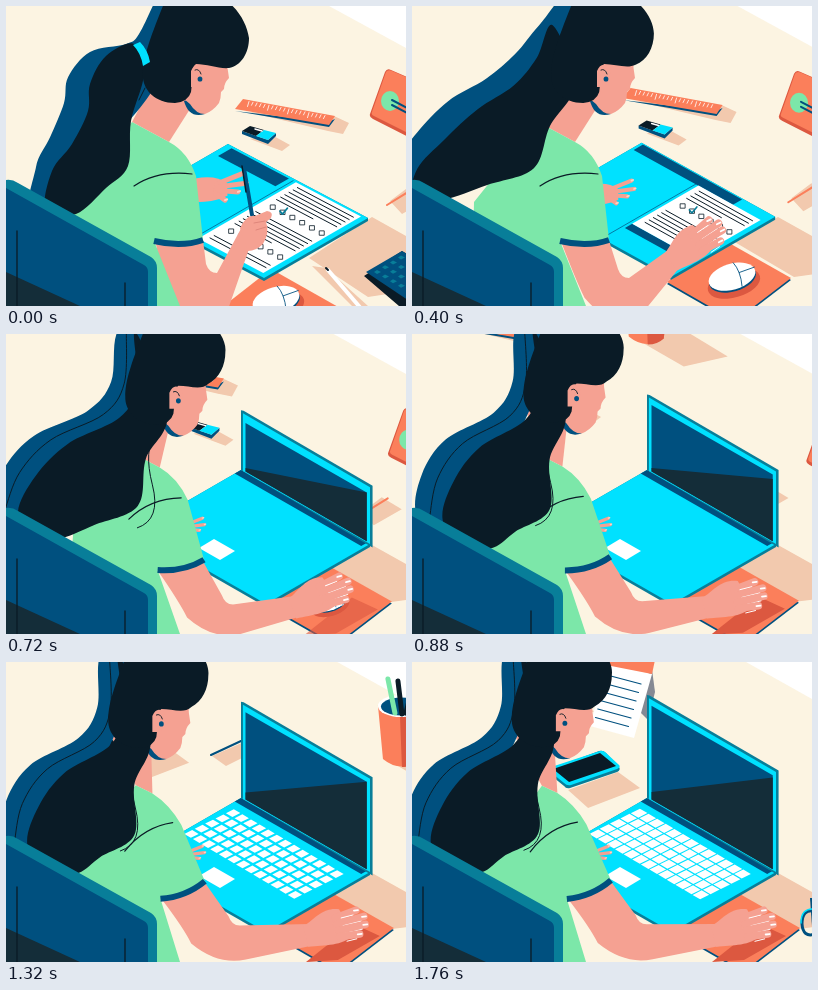
An HTML page for the animation above (1800 ms loop, 400 by 300 pixels).

```html
<!DOCTYPE html>
<html lang="en">
<head>
<meta charset="utf-8">
<title>From paper to laptop</title>
<style>
html, body { margin: 0; width: 100%; height: 100%; overflow: hidden; background: #fcf4e2; }
svg { display: block; width: 100vw; height: 100vh; }
</style>
</head>
<body>
<svg id="stage" viewBox="0 0 400 300" stroke-linecap="round" stroke-linejoin="round"></svg>
<script>
const LOOP = 1800, STEP = 40;
const C = {
  cream: '#fcf4e2', peach: '#f2c9ae', orange: '#fb7f5b', rust: '#dc5840', cyan: '#00e1ff', grey: '#858993',
  navy: '#00507f', teal: '#087e99', ink: '#0a1b26', dusk: '#142d39', skin: '#f5a192', green: '#7ce7a9', white: '#fff'
};

/* ---------- motion ---------- */
const settle = (t, from, tau) => t < from ? 0 : 1 - Math.exp((from - t) / tau);
const ease = (t, from, to) => {
  const s = Math.max(0, Math.min(1, (t - from) / (to - from)));
  return s * s * (3 - 2 * s);
};
const glide = t => 1 - Math.exp((1080 - t) / 270);
const rush = t => Math.max(0, (t - 180) / 380) ** 2;
const mix = (a, b, k) => Array.isArray(a) ? a.map((v, i) => mix(v, b[i], k)) : a + (b - a) * k;

/* ---------- drawing ---------- */
const pairs = a => Array.from({ length: a.length / 2 }, (_, i) => [a[2 * i], a[2 * i + 1]]);
const xy = p => p.map(v => +v.toFixed(2)).join(' ');
const path = (d, fill, extra = '') => `<path d="${d}" fill="${fill}" ${extra}/>`;
const line = (d, color, width = 1) => path(d, 'none', `stroke="${color}" stroke-width="${width}"`);
const poly = (points, fill, extra) => path('M' + points.map(xy).join('L') + 'Z', fill, extra);
const flat = (fill, ...n) => poly(pairs(n), fill);
const seg = (a, b, color, width) => line(`M${xy(a)}L${xy(b)}`, color, width);
const oval = (x, y, rx, ry, fill) => `<ellipse cx="${x}" cy="${y}" rx="${rx}" ry="${ry}" fill="${fill}"/>`;
const moved = (x, y, body, turn = 0, size = 1) =>
  `<g transform="translate(${xy([x, y])}) rotate(${turn.toFixed(2)}) scale(${size.toFixed(3)})">${body}</g>`;

// Catmull-Rom spline through the points.
function smooth(points, closed = true) {
  const n = points.length;
  const at = i => closed ? points[(i + n) % n] : points[Math.max(0, Math.min(n - 1, i))];
  let d = 'M' + xy(points[0]);
  for (let i = 0; i < (closed ? n : n - 1); i++) {
    const [a, b, c, e] = [at(i - 1), at(i), at(i + 1), at(i + 2)];
    d += 'C' + xy([b[0] + (c[0] - a[0]) / 6, b[1] + (c[1] - a[1]) / 6,
      c[0] - (e[0] - b[0]) / 6, c[1] - (e[1] - b[1]) / 6, ...c]);
  }
  return d + (closed ? 'Z' : '');
}

/* ---------- things on the table ---------- */
function ruler() {
  let s = flat(C.peach, 242, 106, 322, 125, 337, 128, 343, 117, 328, 110)
    + flat(C.navy, 229, 105, 323, 121, 329, 113, 322, 116) + flat(C.orange, 229, 103, 237, 93, 329, 110, 323, 119);
  for (let i = 0; i < 20; i++) {
    const x = 243 + i * 4, y = 95.5 + i * .74;
    s += seg([x, y], [x - 1.5, y + (i % 5 ? 3 : 5)], C.white, .8);
  }
  return s;
}
const eraser = () => flat(C.peach, 244, 133, 276, 145, 284, 139, 264, 128)
  + flat(C.navy, 236, 125, 262, 134, 270, 127, 270, 130, 262, 138, 236, 128)
  + flat(C.ink, 236, 125, 244, 120, 258, 124, 250, 130) + flat(C.cyan, 250, 130, 258, 124, 270, 127, 262, 134)
  + seg([249, 123], [256, 125], C.white, 1.5);
const notebook = () => path('M364 108L379 66Q381 62 385 64L440 88V150L367 113Q363 111 364 108Z', C.rust)
  + path('M366 106L380 66Q382 63 386 65L440 88V146L368 110Q365 109 366 106Z', C.orange)
  + oval(384, 95, 9, 10, C.green) + line('M386 94L405 104M386 99L405 109', C.navy, 2);
const strip = () => flat(C.peach, 384, 195, 404, 180, 424, 192, 396, 208) + seg([381, 199], [410, 181], C.orange, 2);
function calculator() {
  let s = flat(C.ink, 358, 270, 396, 245, 440, 272, 400, 300, 400, 306) + flat(C.navy, 360, 266, 396, 245, 440, 270, 402, 294);
  for (let i = 0; i < 5; i++) for (let j = 0; j < 4; j++) {
    const x = 371 + i * 8 + j * 8, y = 266 + i * 4.6 - j * 4.8;
    s += flat(C.teal, x - 3, y, x, y - 2, x + 4, y, x, y + 2);
  }
  return s;
}
const whitePen = () => flat(C.peach, 306, 260, 320, 262, 362, 300, 346, 300)
  + seg([322, 264], [358, 306], C.white, 4) + seg([320, 262], [322, 264], C.ink, 2);
const cup = () => flat(C.peach, 354, 44, 420, 84, 376, 94, 336, 71)
  + path('M316 10L321 64Q338 78 356 66L362 10Z', C.orange) + path('M338 20L362 10L356 66Q350 72 340 72Z', C.rust)
  + oval(339, 11, 23, 11, C.white) + oval(339, 11.5, 20, 9, C.navy)
  + line('M333 18L326 -16', C.green, 5) + line('M340 19L336 -14M344 18L352 -14', C.ink, 5);
const phone = () => flat(C.peach, -16, 21, 34, 3, 56, 19, 4, 39)
  + path('M-36 1L15 -18Q19 -19 22 -16L35 -2Q37 1 33 3L-14 19Q-18 20 -20 17L-36 4Z', C.teal)
  + path('M-36 -1L16 -18Q19 -19 22 -16L35 -4Q37 -2 33 0L-13 16Q-17 17 -20 14L-36 1Z', C.cyan)
  + flat(C.ink, -31, 0, 16, -16, 32, -3, -15, 13);
function calendar() {
  let s = flat(C.grey, 239, 0, 243, 30, 236, 58, 228, 50) + flat(C.white, 195, 2, 240, 12, 222, 76, 178, 64)
    + flat(C.orange, 196, -8, 243, -2, 240, 12, 194, 3);
  for (let i = 0; i < 6; i++) s += seg([195 - i * 2.3, 13 + i * 8.5], [229 - i * 2.5, 22 + i * 8.5], C.navy, 1.2);
  return s;
}
const stick = () => flat(C.peach, 206, 94, 238, 80, 244, 92, 220, 104) + seg([205, 93], [235, 79], C.navy, 2);
const mug = () => flat(C.navy, 398, 236, 430, 236, 430, 278, 401, 278) + line('M402 249Q390 247 390 262Q391 276 403 272', C.navy, 3)
  + line('M402 247Q389 246 389 261', C.cyan, 1.5);

function table(t) {
  const along = (d, body, slope = .59) => Math.abs(d) > 400 ? '' : moved(d, d * slope, body);
  const out = rush(t), come = glide(t), rest = come - glide(1760), d = Math.exp(-t / 223);
  return flat(C.cream, 0, 0, 400, 0, 400, 300, 0, 300) + flat(C.white, 323 + t / 160, 0, 400, 0, 400, 42 - t / 350)
    + along(-55 * out, ruler()) + along(-28 * out, eraser()) + along(9 * out, notebook()) + along(-14 * out, strip())
    + along(95 * come, cup()) + along(180 * (come - glide(1320)), stick())
    + moved(47, 37, along(136 * come, phone(), .56)) + along(160 * rest, calendar(), .7)
    + flat(C.peach, 325 - 22 * d, 232 + 20 * d, 366, 211, 402, 231, 402, 265 + 20 * d, 386 - 24 * d, 267 + 24 * d)
    + along(t * .125, calculator()) + along(t * .4, whitePen()) + along(-60 * rest, mug());
}

function pad(t) {
  const d = Math.exp(-t / 223), grip = ease(t, 560, 840);
  const mouse = oval(0, 2, 24, 13, C.navy) + oval(0, 0, 24, 13, C.white) + line('M5 -13Q10 -3 7 12M8 -2L24 -3', C.navy, .8);
  return moved(-54 * d, 36 * d, flat(C.navy, 264, 272, 319, 229, 388, 268, 332, 311) + flat(C.orange, 264, 270, 319, 227, 388, 266, 332, 309)
      + path('M300 300L348 262L374 274L332 298Z', C.rust, `opacity="${grip}"`))
    + moved(330 - 60 * d - 8 * grip, 266 + 28 * d, oval(0, 7, 27, 14, C.rust) + mouse, -16, 1 - .45 * grip);
}

/* ---------- booklet that becomes a laptop ---------- */
function device(t) {
  const turn = ease(t, 200, 560);
  const [ox, oy, ux, uy] = mix([222, 138, 140, 74], [235, 136, 129, 74], turn);
  const at = (u, v, up = 0) => [ox + u * ux - v * 104, oy + u * uy + v * 60 - up];
  const quad = (u, v, w, z, fill) => poly([at(u, v), at(w, v), at(w, z), at(u, z)], fill);
  let s = poly([at(0, 0), at(1, 0), at(1, 0, -3), at(1, 1, -3), at(0, 1, -3), at(0, 1)], C.teal) + quad(0, 0, 1, 1, C.cyan)
    + quad(...mix([.04, .02, .45, .15], [0, 0, .98, .06], turn), C.navy);

  const fold = ease(t, 240, 660);
  if (fold < 1) {
    const top = mix(.02, .25, fold), end = mix(.96, .26, fold);
    if (fold > .1) s += quad(.5, end, .96, end + .07, C.navy);
    s += quad(.5, top, .965, end, C.white);
    for (let v = .06; v < .94; v += .04) {
      const row = Math.round((v - .06) / .04);
      if (v < top + .02 || v > end - .03) continue;
      if (row % 10 < 6) s += seg(at(.54, v), at(row % 10 === 5 ? .8 : .94, v), C.ink, 1);
      else if (row % 10 === 7) for (let i = 0; i < 6; i++) {
        const [x, y] = at(.575 + i * .07, v);
        s += path(`M${x - 2.5} ${y - 2}h4.6v4.4h-4.6z`, C.white, `stroke="${C.ink}" stroke-width=".8"`);
        if (i === 1 && row === 7) s += line(`M${x - 3} ${y - 1}l2.5 3l5 -6`, C.teal, 1.6);
      }
    }
    s += seg(at(.48, top), at(.48, 1), C.navy, .7);
  }

  const touch = ease(t, 440, 720);
  if (touch) s += flat(C.white, 193, 214, 208, 205, 208 + 21 * touch, 205 + 12 * touch, 193 + 21 * touch, 214 + 12 * touch);

  const size = .9 * settle(t, 880, 240), cols = 13, rows = 5;
  let keys = '';
  for (let i = 0; size && i < cols; i++) for (let j = 0; j < rows; j++) {
    const corner = (a, b) => {
      const u = (i + .5 + a * size) / cols, v = (j + .5 + b * size) / rows;
      return [228 + 112 * u - 52 * v, 146 + 66 * u + 26 * v];
    };
    keys += 'M' + [corner(-.5, -.5), corner(.5, -.5), corner(.5, .5), corner(-.5, .5)].map(xy).join('L') + 'Z';
  }
  s += path(keys, C.white);

  const h = 106 * settle(t, 400, 385);
  if (h) {
    const dim = settle(t, 880, 220), view = Math.max(0, h - 9) * ease(t, 440, 760);
    const a = at(.035, 0, 1), b = at(.975, 0, 1), up = (p, n) => [p[0], p[1] - n];
    s += poly([at(0, 0, h), at(.02, 0, h + 1), at(1.02, 0, h), at(1.02, 0, -2), at(1, 0, -2), at(0, 0)], C.teal)
      + poly([at(.015, 0, h - 2), at(1, 0, h - 3), at(1, 0), at(.015, 0)], C.cyan)
      + poly([a, up(a, view), up(b, view), b], C.navy)
      + poly([a, [a[0], Math.max(134 - 4 * dim, a[1] - view)], [b[0], Math.max(145 - 30 * dim, b[1] - view)], b], C.dusk);
  }
  return s;
}

/* ---------- woman ---------- */
function restingHand(t) {
  const k = ease(t, 200, 640), [x, y, size] = mix([204, 184, 1], [175, 195, .65], k);
  let s = path('M-16 -10Q4 -16 16 -9L18 4Q6 12 -16 14Z', C.skin);
  for (let i = 0; i < 4; i++) {
    const a = 32 - 4 * (i - 1) ** 2 + (i < 2 ? 3 : 0), b = -20 + 9.5 * i;
    s += seg([6, b / 3], [a, b], C.skin, 5) + seg([a, b], [a + 2, b - 1], '#fbd3c8', 2);
  }
  return moved(x, y, s, 6, size);
}

const ARM = {
  write: [150, 238, 166, 300, 190, 335, 243, 243, 238, 217, 203, 267, 197, 234],
  reach: [150, 238, 178, 285, 202, 308, 284, 282, 278, 262, 214, 276, 197, 235],
  rest: [157, 238, 186, 281, 213, 303, 308, 284, 306, 262, 227, 262, 199, 219]
};
function workingArm(t) {
  const swap = ease(t, 220, 560);
  const [hl, elbow, low, wl, wt, inner, hr] = pairs(mix(mix(ARM.write, ARM.reach, swap), ARM.rest, settle(t, 560, 330)));
  const arm = path(`M${xy(hl)}Q${xy([elbow[0] - 8, elbow[1] - 16])} ${xy(elbow)}Q${xy(low)} ${xy([low[0] + 28, Math.min(low[1] - 6, 315)])}L${xy(wl)}L${xy(wt)}L${xy([inner[0] + 8, inner[1]])}Q${xy(inner)} ${xy([inner[0] - 3, inner[1] - 9])}L${xy(hr)}Z`, C.skin);
  if (swap < .5) {
    const lean = Math.min(t, 200) / 28;
    const hand = path('M234 222Q241 208 249 210L261 205Q268 206 265 212L260 216Q264 226 257 238Q250 245 242 245Z', C.skin)
      + line('M248 217L259 215M250 224L260 221', '#d97f75', .8);
    const pen = seg([238, 162 + lean], [246, 209], C.navy, 4) + seg([236, 160 + lean], [240, 186], C.ink, 1.5);
    return moved(wt[0] - 238, wt[1] - 217, pen) + arm + moved(wt[0] - 238, wt[1] - 217, hand);
  }
  let hand = path('M-5 -10C8 -14 18 -24 34 -18L42 10C28 19 12 13 -5 11Z', C.skin);
  for (let i = 0; i < 4; i++) {
    const x = 57 - 3.5 * (i - 1.4) ** 2, y = -13 + 8 * i;
    hand += seg([28, y * .8], [x, y], C.skin, 7.5) + seg([x - 2, y], [x + 2, y + .5], C.white, 1.8)
      + seg([34, y + 4], [x - 4, y + 4], C.white, .9);
  }
  return arm + moved((wl[0] + wt[0]) / 2, (wl[1] + wt[1]) / 2, hand, -14 - 20 * (1 - ease(t, 480, 880)));
}

// Hair outlines relative to the ear: down the back edge, then up the neck edge.
const TIED = {
  back: [-65, -34, -93, -22, -109, 6, -111, 33, -127, 66, -147, 93, -153, 131],
  neck: [-123, 136, -93, 110, -71, 88, -68, 43, -55, -4]
};
const LOOSE = {
  back: [-42, -68, -37, -12, -50, 22, -96, 50, -122, 84, -133, 122, -112, 152],
  neck: [-82, 150, -60, 134, -26, 112, -26, 62, -10, 14]
};
const SHIRT = {
  upright: [126, 116, 163, 136, 182, 146, 190, 170, 197, 234, 148, 235, 62, 196],
  turned: [130, 124, 145, 131, 162, 142, 174, 162, 199, 218, 155, 237, 72, 203]
};

function woman(t) {
  const turn = settle(t, 480, 332), loose = ease(t, 240, 540);
  const ex = 193 - 42 * turn, ey = 72 - 12 * turn;
  const [cl, cr, shoulder, upper, hr, hl, side] = pairs(mix(SHIRT.upright, SHIRT.turned, turn));
  const hem = `M${xy(hr)}Q${xy([(hr[0] + hl[0]) / 2 + 3, (hr[1] + hl[1]) / 2 + 7])} ${xy(hl)}`;
  const [ax, ay, bx, by] = mix([128, 180, 186, 168], [118, 190, 165, 160], turn);

  let s = poly([[ex - 50, ey + 12], [ex - 8, ey + 18], [ex - 9, ey + 31], cr, cl], C.skin)
    + path(`M${xy(cl)}L${xy(cr)}Q${xy(shoulder)} ${xy(upper)}L${hem.slice(1)}L174 300L60 300L${xy(side)}Z`, C.green)
    + path(hem, 'none', `stroke="${C.navy}" stroke-width="6" stroke-linecap="butt"`)
    + line(`M${ax} ${ay}Q${(ax + bx) / 2 - 5} ${(ay + by) / 2 - 10} ${bx} ${by}`, C.ink, 1.2);

  s += moved(ex, ey, path('M-15 23Q-10 41 6 36L-4 20Z', C.navy)
    + path('M-14 -20L28 -22Q28 -10 30 0Q25 5 25 11L22 14Q22 20 20 25Q14 33 6 36Q-3 36 -9 26L-15 21Z', C.skin));

  const swing = t < 880 ? Math.sin(Math.PI * t / 880) : 0;
  const sway = ([x, y], k) => [ex + x - 62 * swing * k ** 1.3, ey + y - 22 * swing * k];
  const back = pairs(mix(TIED.back, LOOSE.back, loose)).map((p, i) => sway(p, i / 6));
  const neck = pairs(mix(TIED.neck, LOOSE.neck, loose)).map((p, i) => sway(p, 1 - i / 4));
  const behind = back.map(([x, y], i) => {
    const bulge = Math.sin(Math.PI * i / 6);
    return [x - 8 - 10 * loose - 16 * bulge, y - 8 * bulge];
  });
  s += path(smooth([...(loose < .5 ? [[ex - 40, ey - 84], [ex - 60, ey - 44]] : []), ...behind, [ex - 45, ey + 10], [ex - 30, ey - 90]]), C.navy);
  if (loose === 1) s += line(smooth(behind.slice(0, 6).map((p, i) => mix(p, back[i], .5)), false), C.ink, 1);
  s += path(smooth([...back, ...neck]), C.ink);

  const fringe = mix([50, -40, 50, -25, 42, -12, 30, -10], [44, -48, 44, -34, 38, -22, 27, -16], loose);
  s += moved(ex, ey, path(`M-32 -82C20 -100 46 -66 ${xy(fringe.slice(0, 2))}C${xy(fringe.slice(2))}C20 -9 8 -14 -3 -14Q-8 -11 -7 5L-8 14Q-11 24 -24 25C-44 25 -55 12 -56 0C-57 -18 -50 -38 -32 -82Z`, C.ink,
      `transform="translate(${4 * loose} 0)"`)
    + path('M-8 -7Q-4 -16 2 -12Q8 -7 3 2L0 9L-8 9Z', C.skin)
    + line('M-4 -8Q0 -10 2 -4', C.ink, .9) + oval(1, 1, 2.4, 2.6, C.navy));
  if (loose < .3) s += moved(t / 90, t / 100, path('M127 39L134 36Q142 44 144 56L137 60Q135 47 127 39Z', C.cyan));
  if (loose === 1) s += line(`M${ex - 22} ${ey + 34}Q${ex - 34} ${ey + 50} ${ex - 25} ${ey + 85}T${ex - 40} ${ey + 128}`, C.ink, 1);
  else s += line(`M${ex - 54} ${ey + 10}L${ex - 60} ${ey + 22}`, C.ink, 1);
  return s;
}

const chair = path('M0 174Q6 173 12 177L145 251Q151 255 151 262V300H0Z', C.teal)
  + path('M0 182L138 259Q142 261 142 266V300H0Z', C.navy)
  + flat(C.dusk, 0, 266, 74, 300, 0, 300) + line('M11 225V300M119 277V300', C.ink, 1.3);

const stage = document.getElementById('stage');
function draw(t) {
  stage.innerHTML = table(t) + pad(t) + device(t) + restingHand(t) + workingArm(t) + woman(t) + chair;
}

let start, shown = 0;
function tick(now) {
  start ??= now;
  const t = Math.floor((now - start) % LOOP / STEP) * STEP;
  if (t !== shown) draw(shown = t);
  requestAnimationFrame(tick);
}
draw(0);
requestAnimationFrame(tick);
</script>
</body>
</html>
```
